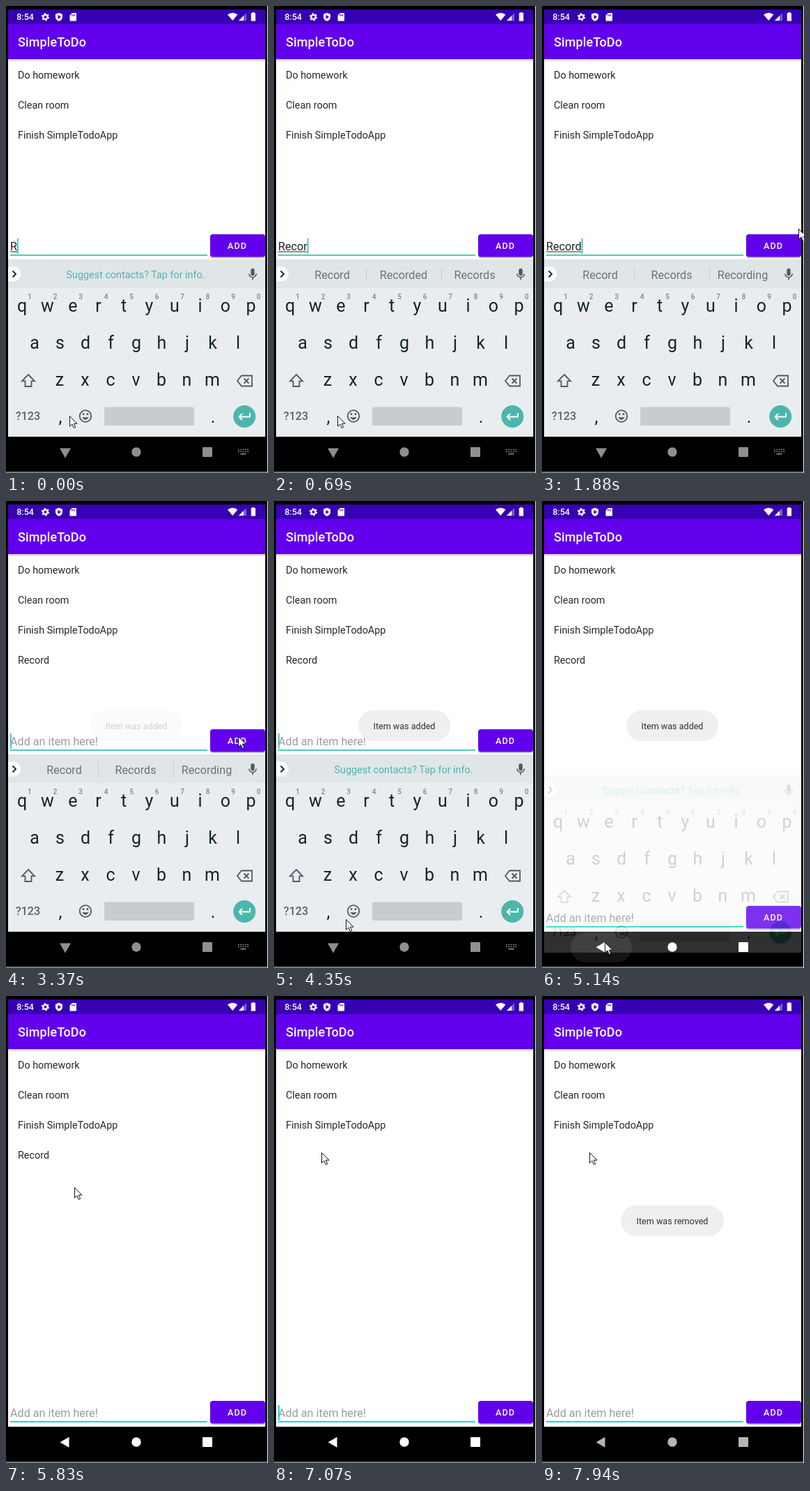
Recreate the animation shown at these times as an HTML page. Size 376 by 669 pixels, loop 8 s.

```html
<!DOCTYPE html>
<html lang="en">
<head>
<meta charset="utf-8">
<title>To-do list</title>
<style>
html, body { margin: 0; width: 100%; height: 100%; overflow: hidden; background: #000; }
svg { display: block; width: 100vw; height: 100vh; font-family: Roboto, "Noto Sans", sans-serif; }
text { white-space: pre; }
.item { font-size: 14.37px; fill: #262626; }
.field { font-size: 16.16px; }
.toast { font-size: 12.57px; fill: #303030; text-anchor: middle; }
.key { font-size: 25px; fill: #13252c; text-anchor: middle; }
.digit { font-size: 10px; font-weight: 500; fill: #7b868b; text-anchor: middle; }
.word { font-size: 16.16px; fill: #66757c; text-anchor: middle; }
.line { fill: none; stroke: #4d5b62; stroke-width: 1.8; }
</style>
</head>
<body>
<svg viewBox="0 0 376 669" preserveAspectRatio="none">
  <defs>
    <linearGradient id="shade" x2="0" y2="1">
      <stop stop-color="#000" stop-opacity=".22"/>
      <stop offset="1" stop-color="#000" stop-opacity="0"/>
    </linearGradient>
  </defs>
  <rect width="376" height="669"/>
  <rect x="3" y="76" width="369" height="541" fill="#fff"/>

  <g id="list"></g>

  <g id="form">
    <text id="hint" class="field" x="6" y="350" fill="#9b9b9b">Add an item here!</text>
    <text id="entry" class="field" x="6" y="350" fill="#222"></text>
    <rect id="under" x="6" y="351.5" height="1" fill="#222"/>
    <rect id="caret" y="333" width="1.8" height="22"/>
    <rect id="rule" x="6" y="356" width="283" height="1.8"/>
    <rect x="293" y="329" width="79" height="32.5" rx="4" fill="#000" opacity=".2"/>
    <rect x="293" y="327" width="79" height="32.5" rx="4" fill="#6200ee"/>
    <rect id="press" x="293" y="327" width="79" height="32.5" rx="4" fill="#fff"/>
    <text x="318" y="347.7" font-size="12.57" font-weight="500" letter-spacing="1.12" fill="#fff">ADD</text>
  </g>

  <rect x="3" y="76" width="369" height="4" fill="url(#shade)"/>
  <rect x="3" y="26" width="369" height="50" fill="#6200ee"/>
  <rect x="3" y="5" width="369" height="21" fill="#3700b3"/>
  <text x="17" y="58.2" font-size="18" font-weight="500" letter-spacing=".12" fill="#fff">SimpleToDo</text>
  <g fill="#fff">
    <text x="15.2" y="20.3" font-size="12.57" font-weight="500">8:54</text>
    <g fill="none" stroke="#fff">
      <circle cx="56.5" cy="15.7" r="3.1" stroke-width="2.3"/>
      <circle cx="56.5" cy="15.7" r="4.7" stroke-width="1.8" stroke-dasharray="2.4 2.52"/>
    </g>
    <path d="M76 9.8l5 2v3.6q0 4.300-5 6.400q-5-2.100-5-6.400v-3.600z"/>
    <path d="M74.500 12.700v6l4.500-3z" fill="#3700b3"/>
    <path d="M95 10h5q1 0 1 1v9.500q0 1-1 1h-7.500q-1 0-1-1v-7z"/>
    <path d="M94.700 12v2.500M96.700 12v2.500M98.700 12v2.500" stroke="#3700b3"/>
    <path d="M318 12.300q7.200-5 14.400 0l-7.200 8.700z"/>
    <path d="M345 10v11h-11z" opacity=".35"/>
    <path d="M341 14v7h-7z"/>
    <path d="M353.400 10v-1h3v1h1.600v11.500h-6.300v-11.500z"/>
  </g>

  <rect x="3" y="617" width="369" height="50"/>

  <g id="keyboard">
    <rect x="3" y="363" width="369" height="254" fill="#e9edf0"/>
    <rect x="3" y="363" width="369" height="41" fill="#e0e5e8"/>
    <path d="M3 373.500h7.500a10.500 10.500 0 0 1 0 21h-7.500z" fill="#fff"/>
    <path d="M9.500 379.500l4.500 4.500l-4.500 4.500" fill="none" stroke="#222c31" stroke-width="2"/>
    <text id="tip" x="186" y="389.700" font-size="14.370" text-anchor="middle" fill="#4db6ac">Suggest contacts? Tap for info.</text>
    <g id="words">
      <text class="word" x="83.5" y="390.5"></text>
      <text class="word" x="186" y="390.5"></text>
      <text class="word" x="288" y="390.5"></text>
      <path d="M132.500 374v21M240.500 374v21" stroke="#c3cbcf"/>
    </g>
    <rect x="351.300" y="376" width="5.400" height="10.500" rx="2.700" fill="#4d5b62"/>
    <path d="M348.800 383.500a5.200 5.200 0 0 0 10.400 0M354 389v3.500" class="line" style="stroke-width:1.5"/>
    <g id="keys"></g>
    <path class="line" d="M32 528l9 9.300h-4.500v7.700h-9v-7.700h-4.500z"/>
    <path class="line" d="M338 529.500h15v15h-15l-6-7.500zM341.500 533.500l7 7M348.500 533.500l-7 7"/>
    <text x="31.500" y="593.300" font-size="16.200" font-weight="500" text-anchor="middle" fill="#57656c">?123</text>
    <circle class="line" cx="114" cy="587.500" r="8.300"/>
    <path class="line" d="M109.500 589.500q4.500 6 9 0z" style="fill:#4d5b62;stroke-width:.5"/>
    <path d="M111 583.300v2.800M117 583.300v2.800" class="line" style="stroke-width:2.400"/>
    <rect x="141" y="574.500" width="129" height="26.500" rx="2.500" fill="#c9cccf"/>
    <circle cx="342.200" cy="588" r="16" fill="#4db6ac"/>
    <path d="M350 583v5.500h-15M339 584l-4.500 4.500l4.500 4.500" fill="none" stroke="#fff" stroke-width="1.900"/>
  </g>

  <rect id="ripple" x="41" y="618" width="88" height="43" rx="21.500" fill="#fff"/>
  <g id="nav">
    <path id="down" d="M77 633.500h16l-8 14z"/>
    <path id="back" d="M90.500 631.800v15l-13-7.500z"/>
    <circle cx="187" cy="639" r="6.700"/>
    <rect x="282" y="632" width="14" height="14" rx="1"/>
    <path id="switcher" d="M333 635.500h15M333 638.500h15" stroke="#8f8f8f" stroke-width="1.700" stroke-dasharray="1.800 1.500"/>
    <path id="switcherBar" d="M336.500 641.700h8" stroke="#8f8f8f" stroke-width="1.600"/>
  </g>

  <g id="toast">
    <rect id="bubble" y="300" height="44" rx="22" fill="#efefef"/>
    <text id="notice" class="toast" x="187" y="327"></text>
  </g>

  <path id="mouse" d="M.5 .5v14.700l3.400-3.200l2.500 5.500l2.300-1l-2.400-5.300h4.700z" fill="#fff" stroke="#111"/>
  <path d="M375.500 0v669M0 668h376" stroke="#f2f2f2"/>
</svg>
<script>
const LOOP = 8000;
const $ = id => document.getElementById(id);
const set = (id, attrs) => {
  for (const name in attrs) $(id).setAttribute(name, attrs[name]);
};
const show = (id, on) => set(id, { visibility: on ? "visible" : "hidden" });
const label = (cls, x, y, s) => `<text class="${cls}" x="${x}" y="${y}">${s}</text>`;

// Each track holds [start, ...values]; a value stays until the next start.
const at = (track, t) => {
  let found = track[0];
  for (const step of track) if (step[0] <= t) found = step;
  return found.slice(1);
};

const typing = [[0, "R"], [150, "Re"], [290, "Rec"], [430, "Reco"], [560, "Recor"], [700, "Record"], [3100, ""]];
const suggestions = [
  [0], [290, "Rec", "Record", "Recipe"], [560, "Record", "Recorded", "Records"],
  [840, "Record", "Records", "Recording"], [3510]
];
const caret = [
  [0, 1], [1340, 0], [1880, 1], [2420, 0], [2820, 1], [3650, 0], [4080, 1],
  [4620, 0], [6100, 1], [6650, 0], [7070, 1], [7550, 0]
];
const mouse = [
  [0, 91, 587], [1340, 106, 566], [1480, 175, 470], [1610, 280, 362], [1750, 350, 312],
  [1880, 368, 319], [2000, 361, 328], [2280, 352, 332], [2420, 344, 335], [2550, 338, 336],
  [2690, 333, 337], [4080, 290, 375], [4220, 170, 520], [4350, 103, 599], [4490, 96, 618],
  [4620, 92, 628], [4760, 90, 632], [5280, 91, 605], [5420, 95, 510], [5560, 99, 400],
  [5690, 101, 310], [5830, 98, 274], [5970, 87, 251], [6100, 74, 235], [6250, 68, 224]
];
const toast = [
  [0, 0], [3370, .22], [3510, .8], [3650, 1], [5420, .9], [5560, .5], [5690, .12],
  [5830, 0], [7190, .25], [7310, .8], [7430, 1]
];
const keyboard = [[0, 0, 1], [5020, 10, .78], [5140, 30, .2], [5280, 0, 0]];
const ripple = [[0, 0], [4890, .07], [5020, .12], [5140, .08], [5280, .03], [5420, 0]];
const press = [[0, 0], [3100, .2], [3370, 0]];
const navColor = [[0, "#8f8f8f"], [5020, "#fff"], [7550, "#ececec"], [7820, "#d0d0d0"], [7940, "#b5b5b5"]];

const items = ["Do homework", "Clean room", "Finish SimpleTodoApp", "Record"];
$("list").innerHTML = items.map((s, i) => label("item", 17, 103.6 + 43.1 * i, s)).join("");
const lastItem = $("list").lastChild;

const rows = [["qwertyuiop", 23, 438], ["asdfghjkl", 41, 490.5], ["zxcvbnm", 77, 543.5]];
$("keys").innerHTML = rows.map(([row, x, y], r) => [...row].map((c, i) => {
  const kx = x + 36.5 * i;
  return label("key", kx, y, c) + (r ? "" : label("digit", kx + 11, 420, (i + 1) % 10));
}).join("")).join("") + label("key", 78, 597, ",") + label("key", 297, 597, ".");

const words = $("words").querySelectorAll("text");

function draw(t) {
  const open = t < 5140;
  const accent = open ? "#3ec4b5" : "#03dac5";

  const [entry] = at(typing, t);
  $("entry").textContent = entry;
  const width = entry ? $("entry").getComputedTextLength() : 0;
  set("under", { width });
  show("hint", !entry);
  set("caret", { x: 6 + width, fill: accent, opacity: at(caret, t)[0] });
  set("rule", { fill: accent });
  set("press", { opacity: at(press, t)[0] });
  set("form", { transform: `translate(0 ${open ? 0 : 253})` });
  lastItem.setAttribute("visibility", t >= 3370 && t < 7070 ? "visible" : "hidden");

  const picks = at(suggestions, t);
  show("tip", !picks.length);
  show("words", picks.length);
  words.forEach((el, i) => { el.textContent = picks[i] || ""; });
  const [drop, alpha] = at(keyboard, t);
  set("keyboard", { transform: `translate(0 ${drop})`, opacity: alpha });

  const raised = t < 5020;
  show("down", raised);
  show("switcher", raised);
  show("switcherBar", raised);
  show("back", !raised);
  set("nav", { fill: at(navColor, t)[0] });
  set("ripple", { opacity: at(ripple, t)[0] });

  const removed = t >= 7000;
  $("notice").textContent = removed ? "Item was removed" : "Item was added";
  set("bubble", removed ? { x: 113, width: 148 } : { x: 121, width: 132 });
  set("toast", { opacity: at(toast, t)[0] });

  const [x, y] = at(mouse, t);
  set("mouse", { transform: `translate(${x} ${y})` });
}

const start = performance.now();
function tick() {
  draw((performance.now() - start) % LOOP);
  requestAnimationFrame(tick);
}
tick();
</script>
</body>
</html>
```
